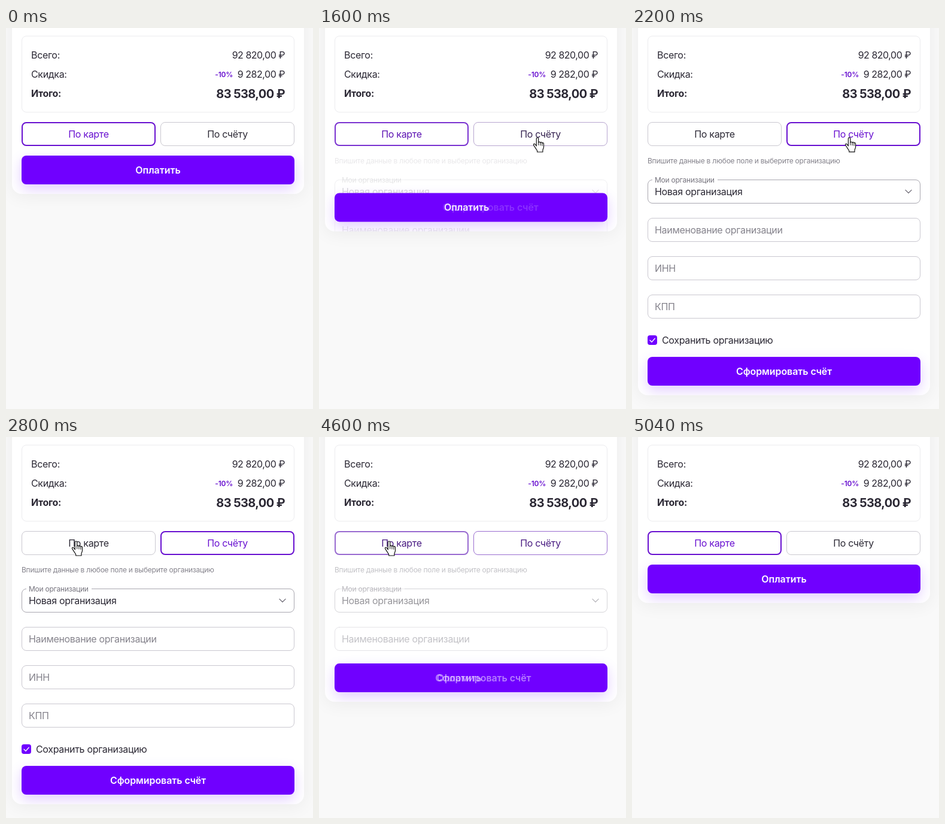
Write an HTML page with a canvas that moves like this. It is 513 px wide and 636 px high and loops after 6.16 s.

```html
<!DOCTYPE html>
<html lang="ru">
<head>
<meta charset="utf-8">
<title>Оплата заказа</title>
<style>
  html, body { margin: 0; width: 100%; height: 100%; overflow: hidden; background: #f9f9f9; }
  canvas { display: block; width: 513px; height: 636px; }
</style>
</head>
<body>
<canvas id="stage" width="513" height="636"></canvas>
<script>
const ctx = document.getElementById('stage').getContext('2d');
const LOOP = 6160, STEP = 40, TRAVEL = 336;
const INK = [43, 40, 52], PURPLE = [104, 16, 208], LINE = [202, 200, 208];
const ACCENT = '#7000ff', MUTED = '#85838c';

const clamp = v => Math.max(0, Math.min(1, v));
const progress = (t, start, length) => clamp((t - start) / length);
const lerp = (a, b, k) => a + (b - a) * k;
const rgb = c => `rgb(${c.map(Math.round).join(',')})`;
const mix = (a, b, k) => rgb(a.map((v, i) => lerp(v, b[i], k)));

// cubic-bezier(.42, 0, .58, 1)
function easeInOut(x) {
  let lo = 0, hi = 1;
  for (let i = 0; i < 24; i++) {
    const u = (lo + hi) / 2, v = 1 - u;
    if (1.26 * u * v * v + 1.74 * u * u * v + u * u * u < x) lo = u; else hi = u;
  }
  return lo * lo * (3 - 2 * lo);
}

function roundRect(x, y, w, h, r) {
  ctx.beginPath();
  ctx.roundRect(x, y, w, h, r);
}

function outline(x, y, w, h, color, width = 1, r = 8) {
  roundRect(x + width / 2, y + width / 2, w - width, h - width, r - width / 2);
  ctx.lineWidth = width;
  ctx.strokeStyle = color;
  ctx.stroke();
}

function text(str, x, y, { size = 16, weight = 400, color = rgb(INK), align = 'left', track = -0.02 } = {}) {
  ctx.font = `${weight} ${size}px Inter, sans-serif`;
  ctx.letterSpacing = `${track * size}px`;
  ctx.textAlign = align;
  ctx.fillStyle = color;
  ctx.fillText(str, x, y);
}

function shadow(color, blur, dy) {
  ctx.shadowColor = color;
  ctx.shadowBlur = blur;
  ctx.shadowOffsetY = dy;
}

function strokePath(path, color, width) {
  ctx.strokeStyle = color;
  ctx.lineWidth = width;
  ctx.lineJoin = ctx.lineCap = 'round';
  ctx.stroke(new Path2D(path));
}

function drawSummary() {
  const price = { align: 'right', track: -0.03 };
  outline(26, 13, 456, 128, '#ececef');
  text('Всего:', 42, 51);
  text('92 820,00 ₽', 466, 51, price);
  text('Скидка:', 42, 83);
  text('-10%', 379, 82, { size: 12, weight: 600, color: rgb(PURPLE), align: 'right' });
  text('9 282,00 ₽', 466, 83, price);
  text('Итого:', 42, 115, { weight: 700 });
  text('83 538,00 ₽', 466, 117, { ...price, size: 20, weight: 700 });
}

function drawTab(label, x, selected) {
  outline(x, 157, 224, 40, mix(LINE, PURPLE, selected), Math.round(1 + selected));
  text(label, x + 112, 183, { color: mix(INK, PURPLE, selected), align: 'center' });
}

function drawForm(alpha) {
  ctx.globalAlpha = alpha;
  text('Впишите данные в любое поле и выберите организацию', 26, 226, { size: 12, color: MUTED });

  outline(26, 253, 456, 40, '#a9a7b0');
  ctx.fillStyle = '#fff';
  ctx.fillRect(34, 252, 109, 3);
  text('Мои организации', 38, 258, { size: 12, color: '#77757f' });
  text('Новая организация', 38, 279);
  strokePath('M457 270.5l5 5 5-5', '#77757f', 1.3);

  ['Наименование организации', 'ИНН', 'КПП'].forEach((label, i) => {
    const y = 317 + 64 * i;
    outline(26, y, 456, 40, rgb(LINE));
    text(label, 38, y + 26, { color: MUTED });
  });

  roundRect(26, 513, 16, 16, 4);
  ctx.fillStyle = ACCENT;
  ctx.fill();
  strokePath('M30 521.2l3 3 5.2-6', '#fff', 1.3);
  text('Сохранить организацию', 50, 527);
  ctx.globalAlpha = 1;
}

function drawPayButton(open) {
  const y = 213 + TRAVEL * open;
  ctx.save();
  shadow('rgba(112,0,255,.2)', 22, 8);
  roundRect(26, y, 456, 48, 8);
  ctx.fillStyle = ACCENT;
  ctx.fill();
  ctx.restore();

  const style = { weight: 600, color: '#fff', align: 'center', track: -0.005 };
  ctx.globalAlpha = open;
  text('Сформировать счёт', 254 + 40 * (1 - open), y + 30, style);
  ctx.globalAlpha = clamp(1.2 - 1.45 * open);
  text('Оплатить', 254 - 40 * open, y + 30, style);
  ctx.globalAlpha = 1;
}

function drawCard(open) {
  const bottom = 277 + TRAVEL * open;
  ctx.save();
  shadow('rgba(0,0,0,.06)', 30, 4);
  roundRect(10, -40, 488, bottom + 40, 16);
  ctx.fillStyle = '#fff';
  ctx.fill();
  ctx.restore();

  ctx.save();
  roundRect(10, -40, 488, bottom + 40, 16);
  ctx.clip();
  drawSummary();
  drawTab('По карте', 26, 1 - open);
  drawTab('По счёту', 258, open);
  if (open > 0) drawForm(open);
  drawPayButton(open);
  ctx.restore();
}

function cursorAt(t) {
  if (t < 840 || t >= 5040) return null;
  if (t < 2160) {
    const left = (1 - progress(t, 800, 480)) ** 2;
    return [365 + 157 * left, 183 + 11 * left];
  }
  const k = easeInOut(progress(t, 2160, 640));
  const exit = Math.max(0, t - 4636) ** 2 * 0.00085;
  return [lerp(365, 117, k) - exit, lerp(183, 174, k)];
}

const HAND = 'M-1.7 14V1.7a1.7 1.7 0 0 1 3.4 0V8.5c0-2 3.2-1.9 3.2.3c.2-1.7 3-1.5 3 .6' +
  'c.3-1.4 2.6-1.1 2.6.8V15.5c0 2.5-1.6 3.5-1.6 6V24H-.3v-1.5c0-2-2.8-4-3.6-6.2L-6.3 12.6c-1-1.9 1-2.9 2.3-1.7z';
const KNUCKLES = 'M1.7 8.5v4M4.9 9v4M7.9 10v3.5';
const ARROW = 'M0 0V16.5L3.8 13l2.4 5.6 2.6-1.1L6.4 12H11.5z';

function drawCursor([x, y]) {
  const overTab = (x >= 26 && x <= 250) || (x >= 258 && x <= 482);
  const shape = overTab ? HAND : ARROW;
  ctx.save();
  ctx.translate(x, y);
  ctx.fillStyle = '#fff';
  ctx.fill(new Path2D(shape));
  strokePath(shape, '#111', 1.2);
  if (overTab) strokePath(KNUCKLES, '#111', 1);
  ctx.restore();
}

function openness(t) {
  if (t < 4520) return easeInOut(progress(t, 1485, 385));
  return 1 - easeInOut(progress(t, 4402, 392));
}

function render(now) {
  const t = Math.floor((now % LOOP) / STEP) * STEP;
  ctx.fillStyle = '#f9f9f9';
  ctx.fillRect(0, 0, 513, 636);
  drawCard(openness(t));
  const cursor = cursorAt(t);
  if (cursor) drawCursor(cursor);
}

const start = performance.now();
function tick() {
  render(performance.now() - start);
  requestAnimationFrame(tick);
}
tick();
</script>
</body>
</html>
```
